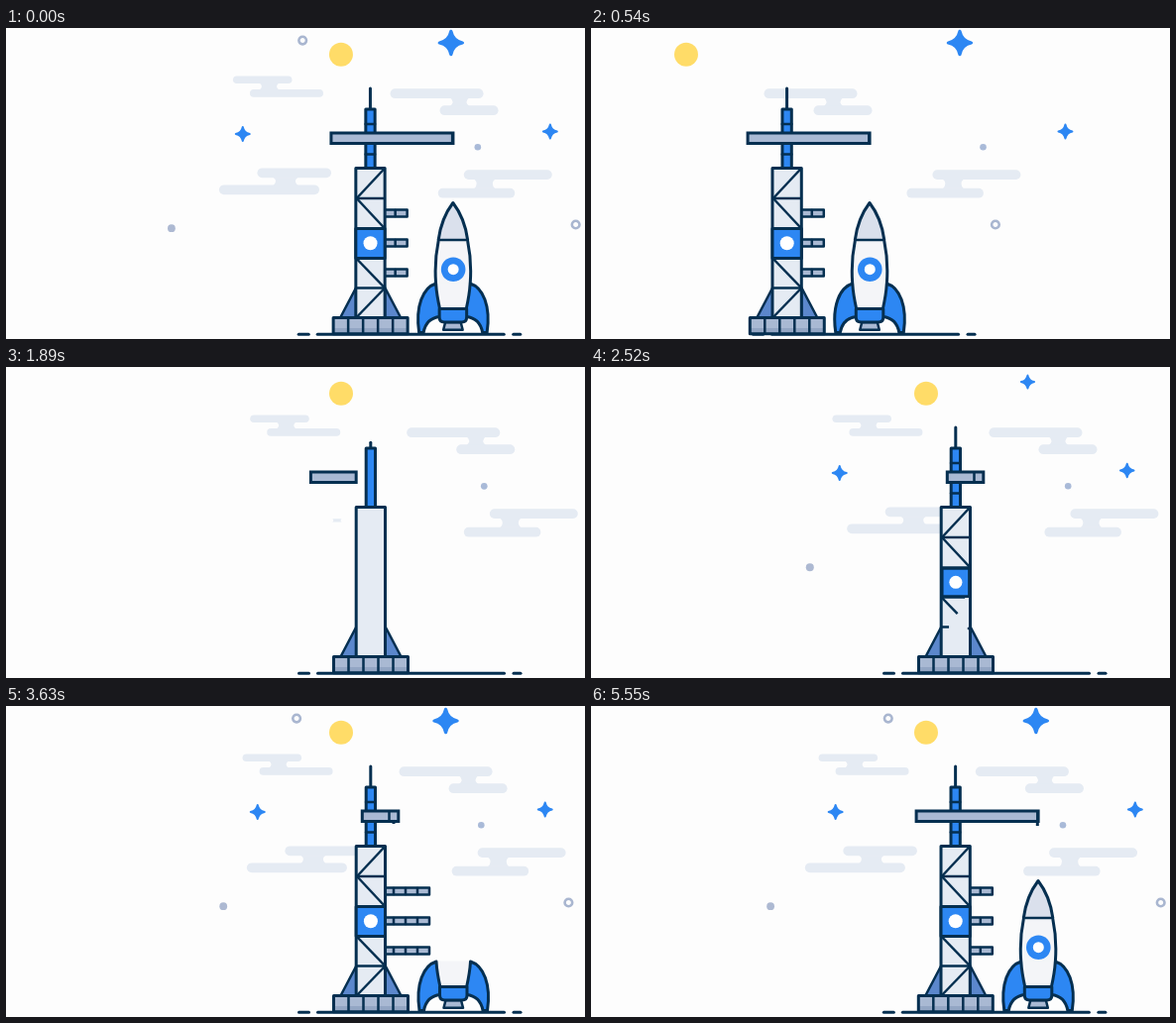
Recreate the animation shown at these times as an HTML page. Size 584 by 314 pixels, loop 5.58 s.

```html
<!DOCTYPE html>
<html lang="en">
<head>
<meta charset="utf-8">
<title>Rocket assembly</title>
<style>
  html, body { margin: 0; width: 100%; height: 100%; overflow: hidden; background: #fdfdfd; }
  svg { display: block; width: 584px; height: 314px; }
  .ink { stroke: #052f50; stroke-width: 3; stroke-linejoin: round; stroke-linecap: round; }
  .thin { stroke-width: 2.5; }
  .line { fill: none; }
  .blue { fill: #2d87f3; }
  .steel { fill: #a9b9d3; }
  .pale { fill: #e5ebf3; }
  .white { fill: #f4f5f8; }
  .nose { fill: #dae0ec; }
  .strut { fill: #5b87cc; }
  .lattice path { stroke-dasharray: 1 2; stroke-linecap: butt; }
</style>
</head>
<body>
<svg viewBox="0 0 584 314">
  <defs>
    <clipPath id="gantryClip"><rect x="382" y="170" width="80" height="100"/></clipPath>
    <g id="fin">
      <path class="ink blue" d="M434 258C421 262 413 281 417 307.500H421.500C423 299 428 292.500 438 291.500V284C436 275 434.500 267 434 258Z"/>
    </g>
  </defs>
  <g id="sky"></g>

  <g id="ground" class="ink line">
    <path d="M295.500 309.300H305.500"/><path d="M314.500 309.300H502.500"/><path d="M512 309.300H519"/>
  </g>

  <g id="site">
    <g id="rope"><path id="cable" class="ink line" style="stroke-linecap:butt"/></g>

    <g id="body">
      <path class="white" d="M436.500 215C433 232 433 246 434 258.500H468.500C469.500 246 469.500 232 466 215Z"/>
      <path class="ink line" style="stroke-linecap:butt" d="M436.500 215C433 232 433 246 434 258.500M466 215C469.500 232 469.500 246 468.500 258.500"/>
    </g>
    <g id="tail">
      <path class="white" d="M434 257.500C434.500 268 436 276 438 284H464.500C466.500 276 468 268 468.500 257.500Z"/>
      <use href="#fin"/>
      <use href="#fin" transform="translate(902.500 0) scale(-1 1)"/>
      <path class="ink steel thin" d="M443.500 297H459L461 304.800H441.500Z"/>
      <path class="ink blue" d="M437.500 283.500H465V292Q465 297 460 297H442.500Q437.500 297 437.500 292Z"/>
    </g>
    <g id="nose">
      <path class="nose" d="M451.200 176.500C444 186 438.500 199 436.500 214H466C464 199 458.500 186 451.200 176.500Z"/>
      <path class="ink line" d="M436.500 214C438.500 199 444 186 451.200 176.500C458.500 186 464 199 466 214"/>
      <path id="noseBase" class="ink line thin" d="M436.500 214H466"/>
    </g>
    <g id="badge">
      <circle class="blue" cx="451.500" cy="243.700" r="12.300"/>
      <circle cx="451.500" cy="243.700" r="5.500" fill="#fff"/>
    </g>

    <g id="gantries" clip-path="url(#gantryClip)"></g>

    <g id="struts" class="ink strut thin">
      <path d="M353.500 262L337.500 292.500H353.500Z"/><path d="M382.500 262L398.500 292.500H382.500Z"/>
    </g>
    <path id="antenna" class="ink line"/>
    <rect id="mast" class="ink blue" x="363.200" width="9.300"/>
    <path id="mastLines" class="ink line thin" d="M363 97H372.500M363 127.500H372.500"/>
    <rect id="tower" class="ink pale" x="353.200" width="29.300"/>
    <g id="lattice" class="lattice"></g>
    <g id="panel">
      <rect class="ink blue" x="353.200" y="202.500" width="29.300" height="30"/>
      <circle cx="367.900" cy="217.300" r="7" fill="#fff"/>
    </g>
    <g id="base">
      <rect class="steel" x="330.500" y="292.500" width="75" height="16.300"/>
      <rect x="330.500" y="303" width="75" height="6" fill="#93a6c4"/>
      <rect class="ink line" x="330.500" y="292.500" width="75" height="16.300"/>
      <path class="ink line thin" d="M345.500 293V308M360.500 293V308M375.500 293V308M390.500 293V308"/>
    </g>
    <g id="crane">
      <rect id="arm" class="ink steel" y="106" height="10.500" style="stroke-linejoin:miter"/>
      <path id="armEnd" class="ink line thin"/>
    </g>
  </g>
</svg>
<script>
const LOOP = 5580;
const NS = 'http://www.w3.org/2000/svg';
const $ = id => document.getElementById(id);
const set = (el, attrs) => { for (const k in attrs) el.setAttribute(k, attrs[k]); return el; };
const add = (parent, tag, attrs) => parent.appendChild(set(document.createElementNS(NS, tag), attrs));

const mix = (a, b, p) => a + (b - a) * p;
const span = (u, start, dur) => Math.min(1, Math.max(0, (u - start) / dur));
const smooth = p => p < .5 ? 2 * p * p : 1 - 2 * (1 - p) ** 2;
const ease = (u, start, dur) => smooth(span(u, start, dur));
const pop = (u, start, dur) => {
  const q = span(u, start, dur) - 1;
  return 1 + 2.2 * q ** 3 + 1.2 * q * q;
};
// Leftward exit: reach is the distance covered 540 ms into the loop.
const leave = (u, reach, lead = 300) =>
  reach * (Math.max(0, u - LOOP + lead) / (540 + lead)) ** 6;

const show = (el, on) => set(el, { visibility: on ? 'visible' : 'hidden' });
const scaleAt = (el, x, y, sx, sy = sx) => {
  show(el, sx > .01 && sy > .01);
  set(el, { transform: `translate(${x} ${y}) scale(${sx} ${sy}) translate(${-x} ${-y})` });
};

// Sky: every item drifts at v px/s, pops in at 'at' and leaves to the left.
const sky = [];
function item(x, y, v, at, reach, lead) {
  const outer = add($('sky'), 'g', {});
  const g = add(outer, 'g', {});
  sky.push({ outer, g, x, y, v, at, reach, lead });
  return g;
}

const clouds = [];
function cloud(y, h, gap, top, low, neck, v, at, reach) {
  const mid = (neck[0] + neck[1]) / 2;
  const outer = add($('sky'), 'g', { class: 'pale' });
  const bar = ([a, b], by) => add(outer, 'rect', { x: a, y: by, width: b - a, height: h, rx: h / 2 });
  const y1 = y + h - 1, y2 = y + h + gap + 1, my = (y1 + y2) / 2;
  const [l, r] = neck;
  const link = add(outer, 'path', {
    d: `M${l - 3} ${y1}Q${l + 3} ${my} ${l - 3} ${y2}H${r + 3}Q${r - 3} ${my} ${r + 3} ${y1}Z`
  });
  clouds.push({ outer, link, bars: [bar(top, y), bar(low, y + h + gap)], mid, my, v, at, reach });
}

function star(x, y, r, v, at, reach, lead) {
  const k = r * .17;
  add(item(x, y, v, at, reach, lead), 'path', {
    d: `M0 ${-r}Q${k} ${-k} ${r} 0Q${k} ${k} 0 ${r}Q${-k} ${k} ${-r} 0Q${-k} ${-k} 0 ${-r}Z`,
    fill: '#2d87f3', stroke: '#2d87f3', 'stroke-width': r * .28, 'stroke-linejoin': 'round'
  });
}
const dot = (x, y, r, fill, ...rest) => add(item(x, y, ...rest), 'circle', { r, fill });
const ring = (x, y, ...rest) => add(item(x, y, ...rest), 'circle',
  { r: 3.8, fill: 'none', stroke: '#a9b6d0', 'stroke-width': 2.6 });

cloud(48.5, 7.6, 6, [230, 289.5], [247, 321], [259, 274], -4.4, 1400, 480);
cloud(61.3, 9.8, 7.2, [388, 482], [438, 497], [451, 465], -4.4, 1200, 209.6);
cloud(141.4, 9.8, 7.2, [254.5, 329], [216, 317], [273, 293], -13.8, 1840, 480);
cloud(143.2, 9.8, 8.8, [462, 551], [436, 513.5], [475, 491], -7, 1120, 113);
dot(338, 26.8, 12, '#ffdc68', 0, 1620, 240, 177);
star(449, 15, 11.6, 2.8, 2480, 78);
star(549, 104.5, 7, 2.7, 2420, 71.5);
star(259, 107, 7, 2.7, 2180, 4200, 375);
ring(300.7, 12.6, 3.9, 2600, 720);
ring(575, 198.5, 3.9, 2820, 168);
dot(476, 120.3, 3.3, '#a9bad8', -1.7, 1680, 79);
dot(216.5, 202.2, 3.9, '#adb9d2', -1.4, 2400, 2971, 550);

const gantries = [[187, 4630], [217, 4530], [247, 4500]].map(([y, back]) => {
  const g = add($('gantries'), 'g', { class: 'ink steel thin' });
  add(g, 'rect', { x: 370, y: y - 3.5, width: 57, height: 7 });
  add(g, 'path', { d: [391, 403, 415].map(x => `M${x} ${y - 3}V${y + 3}`).join('') });
  return { g, back };
});

const lattice = [
  'M382 142L354 172', 'M354 172H382', 'M354 172L382 202', 'M354 202.500H382',
  'M354 232.500H382', 'M354 233L382 262', 'M354 262.500H382', 'M382 263L354 292'
].map(d => add($('lattice'), 'path', { d, class: 'ink line thin', pathLength: 1 }));

// Rocket parts: start of the lift, final top edge, hanging length, rope return time.
const parts = [
  { el: $('tail'), start: 2800, top: 257, hang: 25, wind: 165, back: true },
  { el: $('body'), start: 3750, top: 214, hang: 22, wind: 165, back: true },
  { el: $('nose'), start: 4663, top: 176, hang: 20, wind: 255, back: false }
];

function drawSky(u) {
  const s = (u - LOOP) / 1000;
  for (const i of sky) {
    const x = i.x + i.v * s - leave(u, i.reach, i.lead);
    set(i.outer, { transform: `translate(${x} ${i.y})` });
    scaleAt(i.g, 0, 0, pop(u, i.at, i.dur || 240));
  }
  for (const c of clouds) {
    set(c.outer, { transform: `translate(${c.v * s - leave(u, c.reach)} 0)` });
    scaleAt(c.link, c.mid, c.my, ease(u, c.at, 120));
    for (const b of c.bars) scaleAt(b, c.mid, c.my, ease(u, c.at + 70, 280));
  }
}

function drawTower(u) {
  const g = ease(u, 1110, 360);
  scaleAt($('ground'), 408, 309, g, 1);
  set($('ground'), { transform: `translate(${-leave(u, 131)} 0) ` + $('ground').getAttribute('transform') });
  set($('site'), { transform: `translate(${-leave(u, 169)} 0)` });

  scaleAt($('base'), 368, 309, ease(u, 1250, 200), ease(u, 1250, 200));
  const h = 151 * ease(u, 1380, 300);
  set($('tower'), { y: 292.5 - h, height: h });
  show($('tower'), h > 0);
  scaleAt($('struts'), 368, 292.5, ease(u, 1560, 200));
  const m = 59.5 * ease(u, 1630, 210);
  set($('mast'), { y: 141.5 - m, height: m });
  show($('mast'), m > 0);
  const a = ease(u, 1820, 190);
  set($('antenna'), { d: `M367.8 82V${82 - 21 * a}` });
  show($('antenna'), a > 0);
  scaleAt($('mastLines'), 367.8, 112, ease(u, 2060, 160), 1);

  lattice.forEach((el, i) => {
    const p = ease(u, 2240 + i * 35, 200);
    set(el, { 'stroke-dashoffset': 1 - p });
    show(el, p > 0);
  });
  scaleAt($('panel'), 367.9, 217.5, pop(u, 2430, 240));
  gantries.forEach(({ g, back }, i) => {
    const x = -47 * (1 - ease(u, 2540 + i * 30, 200)) - 22 * ease(u, back, 270);
    set(g, { transform: `translate(${x} 0)` });
  });
}

function drawCrane(u) {
  let reach = 0, rope = 0;
  for (const p of parts) {
    const t = u - p.start;
    const out = ease(t, 170, 270);
    const down = ease(t, 430, 250);
    const wound = ease(t, 680, p.wind);
    const grown = ease(t, 0, 200);
    const drop = mix(p.hang * ease(t, 0, 100), p.top - 117, down);
    if (t > 0) {
      reach = Math.max(reach, out - (p.back ? ease(t, 680, 150) : 0));
      rope = Math.max(rope, drop * (1 - wound));
    }
    const dx = -60 * (1 - out), dy = 117 + drop - p.top;
    scaleAt(p.el, 451, p.top, grown);
    set(p.el, { transform: `translate(${dx} ${dy}) ` + p.el.getAttribute('transform') });
    if (p.el.id === 'nose') set($('noseBase'), { opacity: grown < 1 ? 0 : 1 });
  }
  scaleAt($('badge'), 451.5, 243.7, pop(u, 5180, 240));

  const slide = ease(u, 1760, 280);
  const left = mix(mix(267, 359.3, slide), 328.3, reach);
  const right = mix(mix(320, 395.8, slide), 451.3, reach);
  set($('arm'), { x: left, width: right - left });
  set($('crane'), { opacity: span(u, 1740, 80) });
  set($('armEnd'), { d: `M${mix(386.5, 450.5, reach)} 107V116`, opacity: span(u, 2060, 80) });

  const x = mix(391, 450.5, reach);
  set($('cable'), { d: `M${x} 116V${117 + rope}` });
  show($('cable'), rope > .5);
}

function frame() {
  const t = performance.now() % LOOP;
  // The first second is the tail of the finished scene.
  const u = t < 1000 ? t + LOOP : t;
  drawSky(u);
  drawTower(u);
  drawCrane(u);
  requestAnimationFrame(frame);
}
frame();
</script>
</body>
</html>
```
